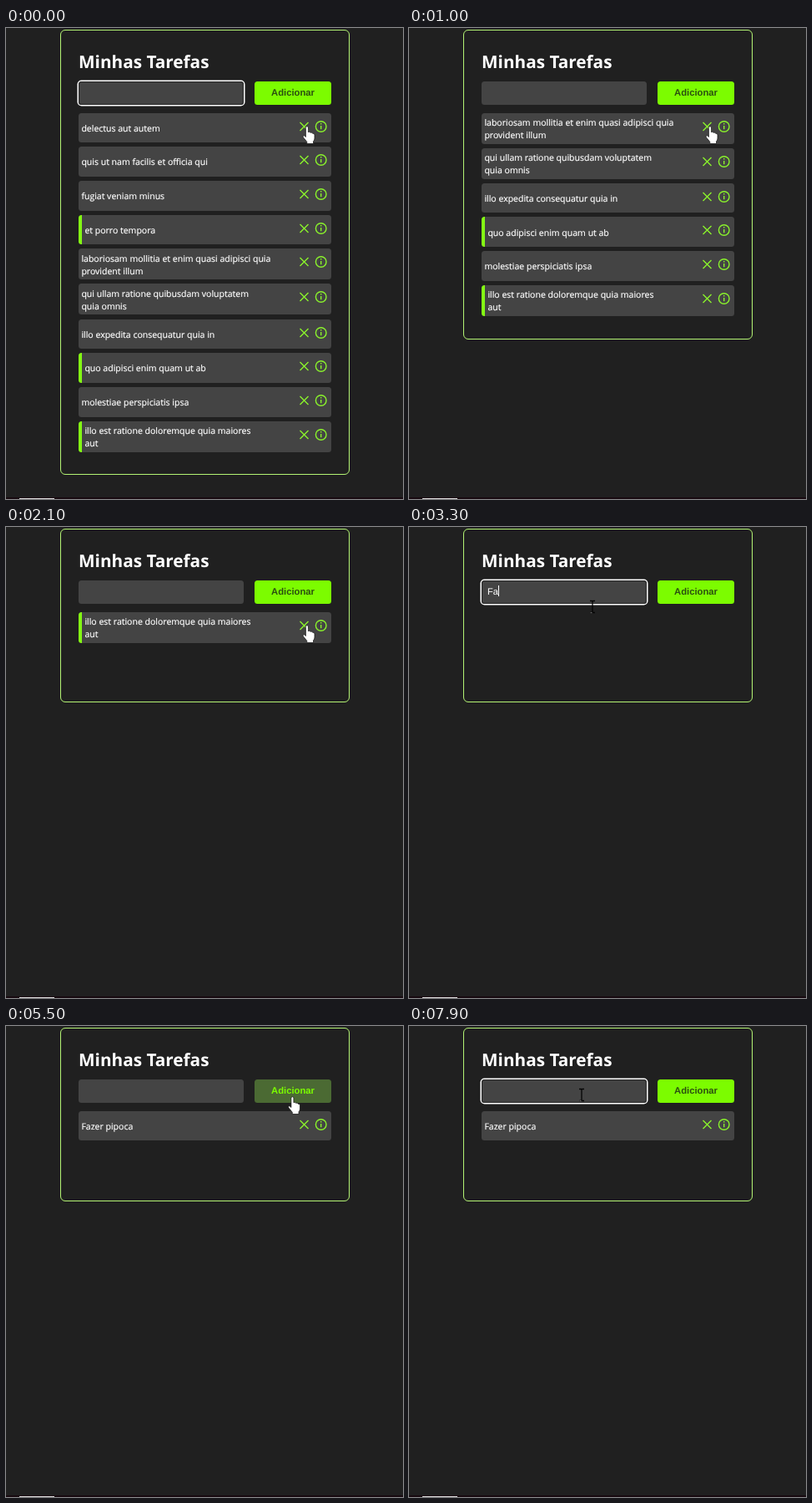
Animation, 476 px wide and 564 px high, one loop 8000 ms. Source, as an HTML page:

```html
<!DOCTYPE html>
<html lang="pt">
<head>
<meta charset="utf-8">
<title>Minhas Tarefas</title>
<style>
html, body { margin: 0; width: 100%; height: 100%; overflow: hidden; background: #202020; }
body { position: relative; color: #fff; font: 10.52px/15px "Open Sans", "Noto Sans", sans-serif; text-rendering: geometricPrecision; }
body > * { position: absolute; box-sizing: border-box; }
#panel { left: 65px; top: 2px; width: 347px; min-height: 208px; padding: 98.6px 21px 21.6px; border: 1px solid #b4f474; border-radius: 6px; }
h1 { left: 87px; top: 26px; margin: 0; font-size: 20.75px; line-height: 30px; white-space: nowrap; }
#field, #add { top: 64px; height: 27.5px; border-radius: 3.5px; font: 11.1px/29px "Liberation Sans", Arial, sans-serif; white-space: pre; }
#field { left: 87px; width: 197.5px; padding-left: 7px; background: #444; }
#field.focus { box-shadow: 0 0 0 1.5px #fff, inset 0 0 0 1px #262626; }
#caret { display: inline-block; width: 1px; height: 13px; background: #fff; vertical-align: -2px; }
#add { left: 298px; width: 92px; background: #7cfc00; color: #2c5010; font-weight: bold; font-size: 11.25px; text-align: center; }
#add.hover { background: #4b6a33; color: #7cfc00; }
.task { position: relative; box-sizing: border-box; display: flex; align-items: center; width: 303px; height: 35.6px; margin-bottom: 5.1px; padding-left: 3.4px; border-radius: 3.5px; background: #444; white-space: pre; }
.task.double { height: 37px; }
.task.done { border-left: 4px solid #84fa14; }
.task span { position: relative; top: 1.8px; -webkit-text-stroke: .2px #fff; }
.task svg { position: absolute; right: 0; top: 0; fill: none; stroke: #8af32c; stroke-width: 1.4; }
#strip { left: 0; top: 562px; width: 100%; height: 2px; background: #180a10; }
#strip i { position: absolute; left: 16px; top: 1px; width: 42px; height: 1px; background: #ddd; }
#pointer { left: 0; top: 0; overflow: visible; }
</style>
</head>
<body>
<div id="panel"></div>
<h1>Minhas Tarefas</h1>
<div id="field"><span id="typed"></span><span id="caret"></span></div>
<div id="add">Adicionar</div>
<div id="strip"><i></i></div>
<svg id="pointer" width="1" height="1">
  <path id="hand" fill="#fff" stroke="#111" stroke-width=".7" stroke-linejoin="round"
    d="M-1.6 1.2Q0-.8 1.4 1.2V7.2Q3 6.2 4 7.8Q5.6 7 6.6 8.8Q8.6 8.2 9 10.4V14.5Q9 17 7.5 18.2V21H-.2V18.8L-4.6 13.4Q-5.6 11.4-3.6 11.2L-1.6 13Z"/>
  <g id="beam" fill="none" stroke="#050505" stroke-width="1.3">
    <path d="M-3-7H-.7L0-6.3L.7-7H3M0-6.3V6.3M-3 7H-.7L0 6.3L.7 7H3"/>
    <path d="M-2.5 7.2H-.5" stroke="#999" stroke-width=".8"/>
  </g>
  <path id="arrow" fill="#fff" stroke="#111" stroke-width=".7" d="M0 0V14L3.2 11L5.4 16L7.6 15L5.4 10.2H10Z"/>
</svg>
<script>
const $ = id => document.getElementById(id);
const LOOP = 8000, BLINK = 530;

// A leading * marks a finished task.
const tasks = [
  "delectus aut autem",
  "quis ut nam facilis et officia qui",
  "fugiat veniam minus",
  "*et porro tempora",
  "laboriosam mollitia et enim quasi adipisci quia\nprovident illum",
  "qui ullam ratione quibusdam voluptatem\nquia omnis",
  "illo expedita consequatur quia in",
  "*quo adipisci enim quam ut ab",
  "molestiae perspiciatis ipsa",
  "*illo est ratione doloremque quia maiores\naut",
];
const removals = [200, 500, 700, 1000, 1200, 1400, 1600, 1800, 2000, 2300];
const newTask = "Fazer pipoca", addTime = 5400;
const keys = [3100, 3300, 3400, 3500, 3600, 3700, 3900, 4100, 4150, 4200, 4250, 4300];
const focusSpans = [[-BLINK, 100], [2600, 4700], [6200, LOOP]];

// Pointer stops: time, x, y
const stops = [[0, 361, 117.5], [2300, 361, 117.5], [2600, 220, 95.5], [4400, 220, 95.5],
  [4800, 343.5, 84.5], [5600, 343.5, 84.5], [6100, 207, 82.5], [LOOP, 207, 82.5]];

const icons = `<svg width="40" height="32"><path d="M2.5 11l10 10m0-10l-10 10"/>
  <circle cx="27.7" cy="16" r="6.3"/><path d="M27.7 15v4.2m0-7.2v1.5"/></svg>`;

function addRow(text) {
  const row = document.createElement("div");
  row.className = "task";
  row.classList.toggle("done", text[0] === "*");
  row.classList.toggle("double", text.includes("\n"));
  row.innerHTML = `<span>${text.replace("*", "")}</span>${icons}`;
  $("panel").append(row);
  return row;
}
const rows = tasks.map(addRow), newRow = addRow(newTask);

function pointerAt(t) {
  const i = stops.findIndex(s => s[0] > t);
  const [t0, x0, y0] = stops[i - 1], [t1, x1, y1] = stops[i];
  const p = (t - t0) / (t1 - t0), ease = p * p * (3 - 2 * p);
  return [x0 + (x1 - x0) * ease, y0 + (y1 - y0) * ease];
}

const show = (el, on) => el.style.display = on ? "" : "none";

function draw(t) {
  rows.forEach((row, i) => show(row, t < removals[i]));
  show(newRow, t >= addTime);

  const count = t < addTime ? keys.filter(k => k <= t).length : 0;
  $("typed").textContent = newTask.slice(0, count);
  const focus = focusSpans.find(([from, to]) => t >= from && t < to);
  $("field").classList.toggle("focus", !!focus);
  const blinkStart = focus && Math.max(focus[0], ...keys.filter(k => k <= t));
  show($("caret"), focus && Math.floor((t - blinkStart) / BLINK) % 2 === 0);

  const [x, y] = pointerAt(t);
  const overAdd = x > 298 && x < 390 && y > 64 && y < 92;
  const overField = x > 87 && x < 284 && y > 64 && y < 97;
  const overIcon = x > 351 && y > 111 && t < 2350;
  $("add").classList.toggle("hover", overAdd);
  show($("hand"), overAdd || overIcon);
  show($("beam"), overField);
  show($("arrow"), !overAdd && !overIcon && !overField);
  $("pointer").style.transform = `translate(${x}px, ${y}px)`;
}

const start = performance.now();
(function tick() {
  draw((performance.now() - start) % LOOP);
  requestAnimationFrame(tick);
})();
</script>
</body>
</html>
```
